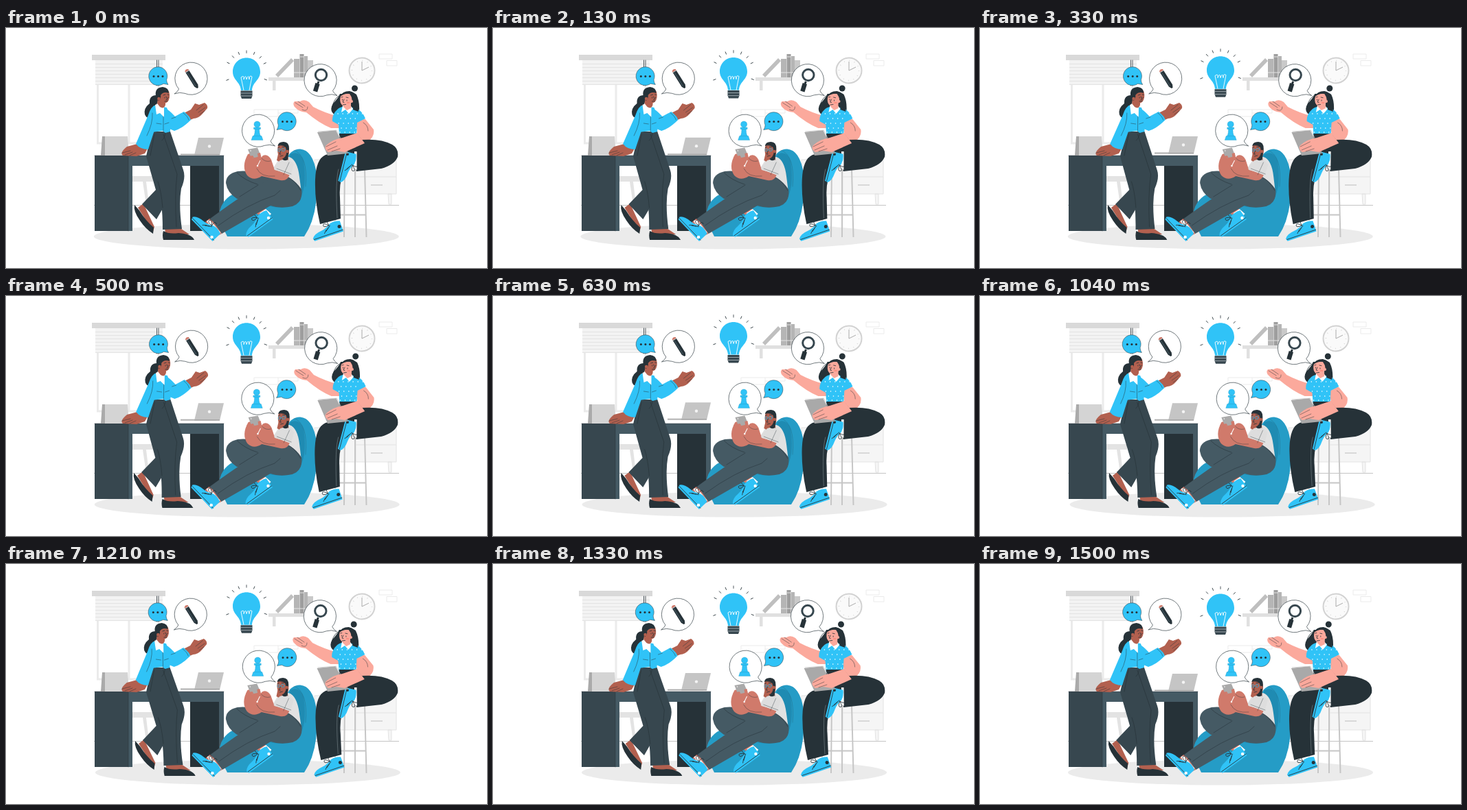
Write an HTML page that moves like this. It is 700x350 px and loops after 1540 ms.

```html
<!DOCTYPE html>
<html lang="en">
<head>
<meta charset="utf-8">
<title>Team ideas</title>
<style>
html, body { margin: 0; width: 100%; height: 100%; overflow: hidden; background: #fff; }
svg { display: block; width: 700px; height: 350px; }
.blue { fill: #30c3f7; }
.dark { fill: #263238; }
.slate { fill: #37474f; }
.steel { fill: #455a64; }
.brown { fill: #b2604f; }
.tan { fill: #d07a6b; }
.pink { fill: #fba99c; }
.line { fill: none; stroke: #263238; stroke-width: .8; stroke-linecap: round; stroke-linejoin: round; }
.faint { fill: none; stroke: #ebebeb; }
.bubble { fill: #fff; stroke: #263238; stroke-width: .65; stroke-linejoin: round; }
</style>
</head>
<body>
<svg viewBox="0 0 700 350">
<defs>
  <g id="shoe">
    <path class="blue" d="M0 0L0-16Q-8-19-15-17Q-22-12-30-11Q-42-10-45.500-4L-44 0Z"/>
    <path class="line" d="M-44-2.500H0M-16-14l-6 4M-19-12l-5 4M-23-10l-4 4M-17-15q-7-7-8-3t8 3q-3-9 3-7"/>
  </g>
  <g id="dots" class="dark">
    <circle cx="-6.500" r="1.500"/><circle r="1.500"/><circle cx="6.500" r="1.500"/>
  </g>
  <path id="balloon" class="bubble" d="M-18.500 15A23.600 23.600 0 1 1-10 21.300Q-17 19-25 22Q-20 19-18.500 15Z"/>
  <path id="chat" class="blue" stroke="#263238" stroke-width=".5" d="M12.200 5.500A13.500 13.500 0 1 0 7.500 11.300L14.500 12.500Q12 9 12.200 5.500Z"/>
</defs>

<!-- room -->
<g>
  <path class="faint" stroke-width="3" d="M133.500 83V168H179V83M179 168H222V83"/>
  <path fill="#f3f3f3" d="M130 47H228V83H130Z"/>
  <path class="faint" style="stroke:#e3e3e3" d="M130 52.500H228M130 57.500H228M130 62.500H228M130 67.500H228M130 72.500H228M130 77.500H228M130 82.500H228"/>
  <path fill="#d9d9d9" d="M125 39H232V47H125Z"/>
  <path class="line" d="M219.500 47V84M222 47V84"/>
  <path class="faint" d="M543 38H562V45H543ZM554 47.500H569V55H554ZM361 119H396V129H361ZM396 119H425V124H396"/>
  <path fill="#e0e0e0" d="M382 72H460V77H382ZM388 77h4.500v14h-4.500Z"/>
  <path fill="#bfbfbf" d="M392 68L415 44L419 48L396 72Z"/>
  <path fill="#b5b5b5" d="M419 45h8v27h-8ZM434 41h5v31h-5Z"/>
  <path fill="#9e9e9e" d="M427.500 38h6v34h-6Z"/>
  <path fill="#c9c9c9" d="M439 47h8v25h-8Z"/>
  <path stroke="#e4e4e4" d="M419 65h20M428 42h6"/>
  <circle cx="518" cy="62" r="18.500" fill="#fafafa" stroke="#d2d2d2" stroke-width="2"/>
  <circle cx="518" cy="62" r="14.500" fill="none" stroke="#c4c4c4" stroke-width="1.500" stroke-dasharray=".6 7"/>
  <path d="M518 49V62L528 57" fill="none" stroke="#aaa"/>
  <path d="M128 258.500H572" stroke="#b5b5b5" stroke-width=".8"/>
  <path fill="#f5f5f5" stroke="#e3e3e3" d="M449 192H568V242H449ZM509 192V242M509 217H568M556 242h5v15h-4Z"/>
  <path stroke="#d8d8d8" stroke-width="2" d="M531 204h17M531 229h17"/>
</g>

<ellipse id="floor" cx="350" cy="304" rx="222" ry="18.500" fill="#ebebeb"/>

<!-- desk -->
<g>
  <path fill="#e3e3e3" d="M184 216H214V224H184ZM199 224h5l4 34h-4Z"/>
  <path class="slate" d="M129 186H178V296H129Z"/>
  <path class="steel" d="M178 186H317V296H310V201H184V296H178Z"/>
  <path class="dark" d="M268 201H310V296H268Z"/>
  <path class="line" d="M129 186H317M178 187V296" stroke-opacity=".6"/>
  <path fill="#d4d4d4" d="M143 158H177L179 186H143Z"/>
  <path fill="#aaa" d="M140 158H144V186H138Z"/>
</g>
<g id="laptop">
  <path fill="#dcdcdc" d="M254 183H306V185.500H254Z"/>
  <path fill="#c5c5c5" d="M280 160H317L311 185.500H274Z"/>
  <path stroke="#888" stroke-width=".8" d="M254 184.700H311"/>
  <circle cx="296" cy="172.500" r="2.200" fill="#f4f4f4"/>
</g>

<g id="bulb">
  <path class="blue" d="M350 43.500C361 43.500 370 52 370 64C370 76 358.500 79 358 91H342C341.500 79 330 76 330 64C330 52 339 43.500 350 43.500Z"/>
  <path fill="none" stroke="#fff" stroke-width=".9" d="M346 91L342 72Q347 68 346 75Q349 66 350 75Q353 66 354 75Q354 68 358 71L354 91"/>
  <path class="slate" d="M341.500 91.500H358.500V99L357 103H343L341.500 99Z"/>
  <path d="M341 95H359M342 99H358" stroke="#a7b2b7" stroke-width=".9"/>
  <g id="rays" class="line"></g>
</g>

<!-- speech bubbles -->
<g id="talkA">
  <use href="#balloon" x="270" y="74"/>
  <g transform="translate(270.500 74) rotate(-32)">
    <path class="dark" d="M-3-13H3V12L1 16H-1L-3 12Z"/>
    <path class="tan" d="M-3-13V-14.500Q0-17.500 3-14.500V-13Z"/>
    <path d="M-3-12.500h6" stroke="#e8e8e8" stroke-width=".8"/>
    <path d="M-1-11V12" stroke="#546e7a" stroke-width=".7"/>
  </g>
</g>
<g id="chatA">
  <use href="#chat" x="221.500" y="70"/><use href="#dots" x="221.500" y="70.500"/>
</g>
<g id="talkB">
  <use href="#balloon" transform="translate(457 76.500) scale(-1 1)"/>
  <path d="M455 78L453.500 82" stroke="#263238" stroke-width="3"/>
  <path d="M453.500 81L450 92.500" stroke="#263238" stroke-width="6.500"/>
  <circle cx="458.500" cy="68.500" r="8.200" fill="#fff" stroke="#37474f" stroke-width="3"/>
</g>
<g id="talkC">
  <use href="#balloon" transform="translate(366.500 150) scale(-1 1)"/>
  <g class="blue" stroke="#1a8fb8" stroke-width=".3">
    <path d="M362 145H369Q368 154 371 158H360Q363 154 362 145Z"/>
    <circle cx="365.500" cy="140.500" r="4.600"/>
    <path d="M360.500 145H370.500V147.500H360.500ZM359 157.500H372L374 163.500H357Z"/>
  </g>
</g>
<g id="chatC">
  <use href="#chat" transform="translate(408.500 136) scale(-1 1)"/><use href="#dots" x="409" y="136.500"/>
</g>

<!-- standing woman -->
<g id="standing">
  <path class="dark" d="M219 98Q208 98 209 110Q200 117 202 126Q205 133 210 130Q210 122 216 117Q220 111 222 104Z"/>
  <path class="brown" d="M200 256L216 290L214 297L192 262Z"/>
  <path class="dark" d="M187 258L194 266Q204 282 215 291L214 300Q203 293 195 281Q185 267 187 258Z"/>
  <path class="slate" d="M212 151H236L247 215Q240 245 219 279L198 257L218 236L204 187Z"/>
  <path class="brown" d="M231 291H252L267 301L232 300Z"/>
  <path class="dark" d="M229 296Q237 301 251 299Q270 300 274 309H229Q227 302 229 296Z"/>
  <path class="slate" d="M211 151H239L258 207Q262 218 255 234Q251 258 256 293L228 294Q228 252 220 224Q208 200 205 187Z"/>
  <path class="line" d="M229 155L249 213Q245 244 248 290M216 155Q213 170 210 186M221 224Q226 238 228 262M232 152q-1 9-5 12" stroke-opacity=".8"/>
  <path class="brown" d="M191 169L207 174L202 183L190 187L170 186Q165 182 176 173Z"/>
  <path class="line" d="M169 182l12-3M173 185l11-4M180 186l9-4" stroke-opacity=".6"/>
  <path class="blue" d="M217 113Q211 114 207 127L189 169Q195 177 207 177L219 140Z"/>
  <path class="brown" d="M259 124L269 119L275 110L281 112L289 109Q294 112 293 117L286 125Q280 132 273 132L263 136Z"/>
  <path class="line" d="M277 120l10-8M280 123l10-7M282 126l7-5" stroke-opacity=".6"/>
  <path class="blue" d="M230 116Q237 119 246 129L259 122Q268 129 269 134Q256 147 245 150L228 143Z"/>
  <path class="blue" d="M215 113L234 116Q240 129 239 151L232 153L228 150L212 152Q211 130 215 113Z"/>
  <path fill="#fff" d="M217 112L222 110L230 115L230 130L224 124L219 126Z"/>
  <path class="brown" d="M221 102H232V112Q230 119 224 115L220 110Z"/>
  <path class="line" d="M229 129V150M219 139l7 1M231 140l6-2M213 124Q214 139 205 157M241 132l6-2M258 124q6 4 8 10" stroke-opacity=".6"/>
  <path class="brown" d="M221 93Q230 88 237 92Q240 102 235 108Q228 113 222 104Z"/>
  <path class="dark" d="M218 99Q216 87 228 86Q237 87 237 95Q229 92 225 98Q226 103 222 106Z"/>
  <path class="line" d="M229 98l3-1M235 97l2 .5M231 101v1M236 101v1M233 100l2 4-2 .5M231 107l4-.5"/>
  <circle cx="222.500" cy="103" r="2.300" class="brown"/>
</g>

<!-- bean bag -->
<path fill="#259cc6" d="M322 304Q311 284 311 267Q315 250 331 242Q380 246 409 190Q414 177 428 176.500Q447 178 452 213Q456 272 434 304Z"/>
<path fill="#1f8bb2" d="M414 184Q427 178 433 194Q440 237 422 258Q399 265 380 259L404 220Z"/>
<path class="line" d="M419 178Q440 186 436 231" stroke-opacity=".25"/>

<g id="sitting">
  <path class="steel" d="M388 218Q355 206 337 209Q320 213 320 226Q322 240 336 249L395 249Z"/>
  <path class="line" d="M336 211Q347 222 366 228" stroke-opacity=".7"/>
  <path class="tan" d="M359 267L372 261L383 268L375 277Z"/>
  <path fill="#fff" d="M369 270L378 264L386 271L378 279Z"/>
  <path class="slate" d="M340 270L378 249L379 262L357 275Z"/>
  <use href="#shoe" transform="translate(388.500 279) rotate(-36)"/>
  <circle cx="382" cy="277" r="2.200" fill="#fff"/>
  <path fill="#e2e2e2" d="M397 191L412 188Q424 192 427 217L430 240L386 230L389 204Z"/>
  <path class="steel" d="M396 214Q368 226 297 278L314 300L385 259Q399 264 417 260Q433 254 430 235Q415 214 396 214Z"/>
  <path class="line" d="M309 288Q351 257 391 244L399 237M367 229L340 246M410 217Q422 224 429 237" stroke-opacity=".65"/>
  <path class="tan" d="M296 278L302 283L314 300L308 303L290 283Z"/>
  <path fill="#fff" d="M292 281L297 280L312 298L306 304Z"/>
  <use href="#shoe" transform="translate(300.500 311) rotate(46)"/>
  <circle cx="299.500" cy="305" r="2.300" fill="#fff"/>
  <path class="brown" d="M396 184L410 184L411 193L403 198L394 193Z"/>
  <path class="tan" d="M352 184Q363 179 370 190L374 186Q381 183 386 192L391 207L413 213Q410 224 399 222L372 216Q360 224 351 215Q342 202 352 184Z"/>
  <path fill="#ddd" d="M399 193Q412 189 419 199L414 215L390 206Q391 200 399 193Z"/>
  <path class="line" d="M412 196l-8 18M394 205l21 8M365 205Q371 218 391 216M372 190q5 6 13 4" stroke-opacity=".5"/>
  <path fill="#aaa" d="M352 177L366 174.500L371 187L357 190Z"/>
  <circle cx="356" cy="179" r=".8" fill="#fff"/>
  <path class="tan" d="M350 188l9-2 2 3-10 3ZM366 183l4-1 2 9-5-1Z"/>
  <path d="M370 193l-4 8" stroke="#fff"/><circle cx="366" cy="201" r="1.200" fill="#fff"/>
  <path class="brown" d="M396 171Q405 167 411 173Q414 183 409 190Q402 194 397 187Q394 181 396 171Z"/>
  <path class="dark" d="M395.500 172Q396 166 404 166Q412 166 412 176L410 192Q405 195 402 191Q408 188 408.500 180L407 174Q403 170 395.500 172Z"/>
  <circle cx="409.500" cy="180" r="2.300" class="brown"/>
  <g class="line">
    <g style="stroke:#2aa9d6"><circle cx="397.500" cy="178" r="2"/><circle cx="403.500" cy="177.500" r="2.300"/></g>
    <path d="M400 179l-2 5h2M399 187l4-1M396 174.500l2-1M402 173.500h3"/>
  </g>
</g>

<!-- stool -->
<path fill="none" stroke="#c6c6c6" stroke-width="2" d="M493 200L492 305M508 205V305M522 205L524.500 305M484 207L479 282M484 272.500H524"/>

<g id="perched">
  <path class="dark" d="M489 96Q500 89 510 97Q515 107 514 122L506 130L480 128Q469 121 476 110Q483 103 486 96Z"/>
  <ellipse class="dark" cx="507.500" cy="88" rx="4.500" ry="4.600"/>
  <path class="line" d="M484 99q-9 7-9 19"/>
  <path class="pink" d="M484 129Q464 124 447 115L441 108Q434 103 428 107L420 107Q416 111 421 116Q426 122 437 123Q456 139 473 146L485 146Z"/>
  <path class="line" d="M421 109l11 7M425 107l10 7M431 119q8 4 8-4" stroke-opacity=".6"/>
  <path class="pink" d="M507 130L523 133L535 148Q537 159 526 166L493 182L483 171L511 153Z"/>
  <path class="blue" d="M483 118Q489 113 498 115L509 117Q518 120 523 132L511 138L510 157H485L484 141L475 136Q474 126 483 118Z"/>
  <path stroke="#fff" stroke-width="1.500" stroke-linecap="round" stroke-dasharray=".1 7" d="M483 125H520M487 132H514M484 139H510M488 146H510M486 152H510"/>
  <path fill="#fff" d="M490 113L502 114L505 118L499 125L494 119L488 123Z"/>
  <path class="pink" d="M491 109H502V117L496 120L491 115Z"/>
  <path class="pink" d="M487 99Q492 94 502 96Q506 106 500 113Q493 118 488 111Q485 107 487 99Z"/>
  <path class="dark" d="M486.500 100Q489 92 500 92Q510 94 512 107L513 122L505 119Q506 104 500 96Q493 95 486.500 100Z"/>
  <circle class="pink" cx="503" cy="107" r="2"/>
  <path class="line" d="M488 101l2-.5M495 101l3 .7M489.500 104v1.200M496 105v1.200M492 104l-2 4 2 .5M490.500 112l4-.5"/>
  <path fill="#fc8175" opacity=".65" d="M496 108h4v2h-4Z"/>
  <path class="dark" d="M485 154H511L518 163Q546 161 562 170Q572 176 570 188Q565 200 546 205L510 209L505 191L486 185Z"/>
  <path class="dark" d="M484 180L507 178Q508 190 496 201Q484 221 486 247L487 278L457 286Q449 251 450 221Q451 191 465 185Z"/>
  <path class="line" style="stroke:#8b989d;stroke-width:.5" d="M484 206Q479 222 482 277M510 181v24"/>
  <path fill="#fff" d="M507 180h3.500v27l-4-2Z"/>
  <use href="#shoe" transform="translate(494 180) rotate(-76) scale(1 -1)"/>
  <circle class="dark" cx="497" cy="184" r="2"/>
  <path fill="#fff" d="M463 286L486 279L488 284L468 291Z"/>
  <use href="#shoe" transform="translate(491 296.500) rotate(-19)"/>
  <circle class="dark" cx="485" cy="289.500" r="2.500"/>
  <path fill="#a9a9a9" d="M453 152L480 149L497 183L468 186Z"/>
  <path fill="none" stroke="#c9c9c9" stroke-width=".8" d="M454 151L481 149L498 183"/>
  <path class="pink" d="M490 160L511 153L522 168L493 181L481 179L469 181Q462 176 466 171Q476 162 490 160Z"/>
  <path class="line" d="M466 173l14-7M468 178l14-6M474 180l12-4M520 138q7 4 7 12" stroke-opacity=".6"/>
</g>
</svg>
<script>
const LOOP = 1540, FRAMES = 37;
const el = id => document.getElementById(id);
const move = (id, x, y = 0) => el(id).setAttribute('transform', `translate(${x} ${y})`);
const lean = (id, k, pivot) => el(id).setAttribute('transform', `matrix(1 0 ${k} 1 ${-k * pivot} 0)`);

el('rays').innerHTML = [-202, -153, -131, -112, -90, -68, -47, -26, 21]
  .map(a => `<path d="M28 0H31.500" transform="translate(350 64.500) rotate(${a})"/>`).join('');

// 24 steps per second, rounded to 10 ms
function stepAt(t) {
  let i = Math.floor(t * 0.024) + 1;
  while (Math.round(i * 25 / 6) * 10 > t) i--;
  return i;
}

function draw(now) {
  const a = stepAt(now % LOOP) / FRAMES * 2 * Math.PI;
  const sway = Math.sin(a), rise = (1 - Math.cos(a)) / 2;
  move('bulb', 0, -6 * rise);
  move('laptop', 0, -5.2 * rise);
  move('floor', 1.1 - 1.7 * Math.cos(a - 0.7));
  lean('standing', -0.014 * sway, 185);
  lean('perched', -0.014 * sway, 185);
  lean('sitting', -0.013 * sway, 235);
  move('talkA', 0.7 * sway);
  move('chatA', 0.7 * sway);
  move('talkB', 0.7 * sway);
  move('talkC', -0.8 * sway);
  move('chatC', -0.5 * sway);
}

function tick() {
  draw(performance.now());
  requestAnimationFrame(tick);
}
tick();
</script>
</body>
</html>
```
